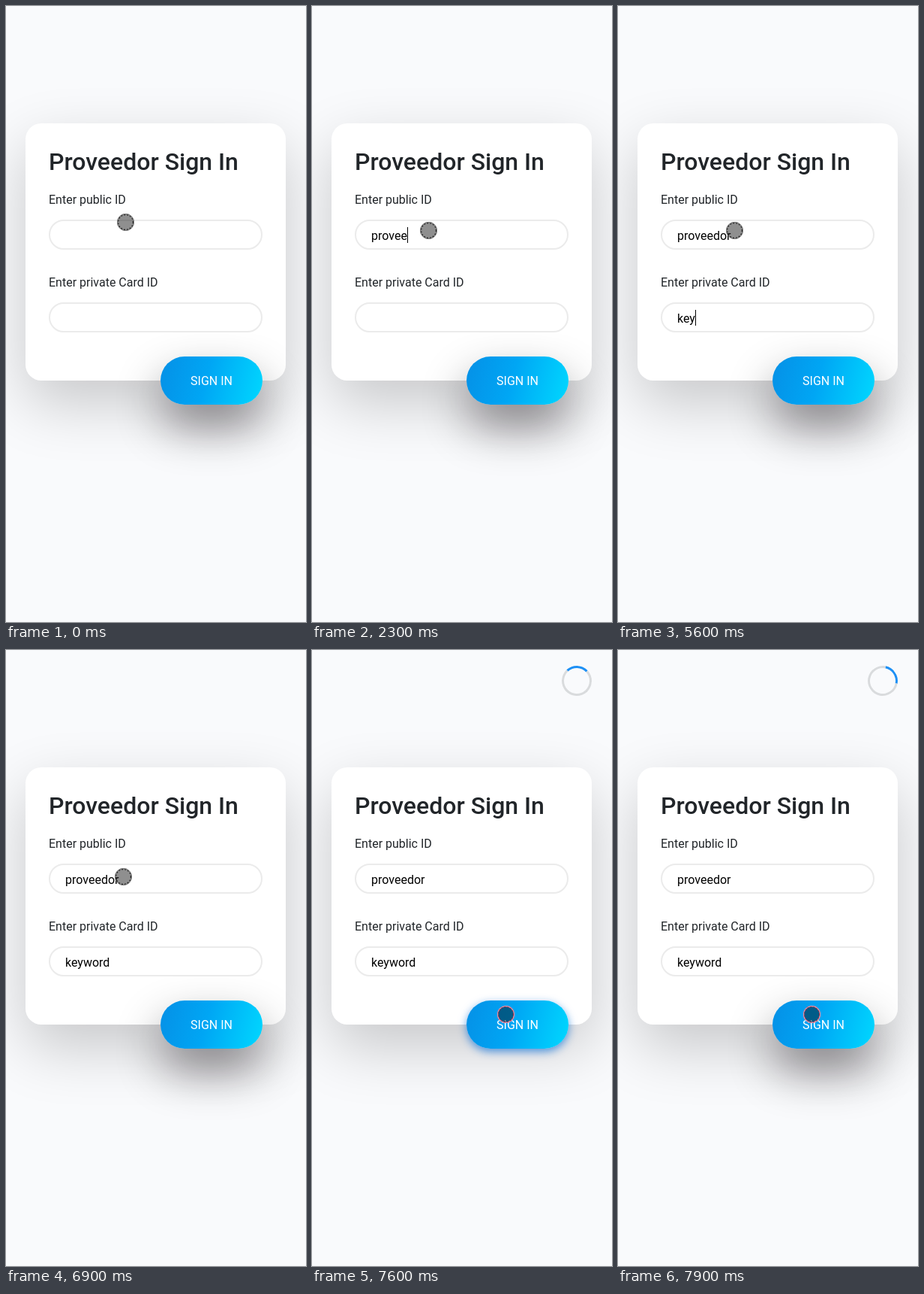
These frames come from a looping animation (400x819 px, 8000 ms). An HTML page:

```html
<!DOCTYPE html>
<html lang="en">
<head>
<meta charset="utf-8">
<title>Sign in</title>
<style>
  html, body { margin: 0; width: 100%; height: 100%; overflow: hidden; background: #f9fafc; }
  #stage {
    position: relative; width: 400px; height: 819px; overflow: hidden;
    background: #f9fafc; color: #212529;
    font: 400 16px/19px Roboto, sans-serif; white-space: pre;
  }
  #stage > * { position: absolute; box-sizing: border-box; }
  .card {
    left: 26px; top: 156px; width: 347px; height: 342px; border-radius: 21px;
    background: #fff; box-shadow: 0 30px 80px rgba(0, 0, 0, .2);
  }
  .title { left: 57px; top: 188px; font-size: 32px; font-weight: 500; line-height: 38px; }
  .label { left: 57px; }
  .field {
    left: 57px; width: 285px; height: 40px;
    border: 2px solid #ebebeb; border-radius: 20px; background: #fff;
  }
  .typed { left: 79px; color: #000; }
  #caret { width: 1px; height: 21px; background: #000; }
  #button {
    left: 206px; top: 466px; width: 136px; height: 64px; border-radius: 32px;
    background: linear-gradient(105deg, #0590e6, #00a6f4 45%, #00d8ff);
    box-shadow: 0 30px 60px rgba(10, 5, 12, .45);
    color: #fff; text-align: center; line-height: 65px;
  }
  #button.pressed { box-shadow: 0 4px 12px rgba(0, 105, 215, .65); }
  #spinner {
    left: 333px; top: 21px; width: 40px; height: 40px; border-radius: 50%;
    border: 3px solid #d9dbdd; border-top-color: #1e90f5;
  }
  #pointer { left: 0; top: 0; width: 24px; height: 24px; }
  #pointer .disc { fill: rgba(0, 0, 0, .44); }
  #pointer .rim { fill: none; stroke: #777; stroke-width: 1; }
  #pointer .dots { fill: none; stroke: #222; stroke-width: 1.2; stroke-dasharray: 2 2; }
  #pointer.inverted .rim { stroke: #e58fa6; stroke-width: 1.4; }
  #pointer.inverted .dots { stroke: #74324f; }
</style>
</head>
<body>
<div id="stage">
  <div class="card"></div>
  <div id="button">SIGN IN</div>
  <div class="title">Proveedor Sign In</div>
  <div class="label" style="top:248px">Enter public ID</div>
  <div class="field" style="top:284px"></div>
  <div class="label" style="top:358px">Enter private Card ID</div>
  <div class="field" style="top:394px"></div>
  <span class="typed" id="publicId" style="top:296px"></span>
  <span class="typed" id="cardId" style="top:406px"></span>
  <div id="caret"></div>
  <div id="spinner"></div>
  <svg id="pointer" viewBox="-12 -12 24 24">
    <circle class="disc" r="11.4"/>
    <circle class="rim" r="11"/>
    <circle class="dots" r="9.9"/>
  </svg>
</div>
<script>
  const LOOP = 8000, STEP = 100, BLINK = 500;
  const PRESS = 7600, RELEASE = 7800;
  const $ = id => document.getElementById(id);

  // [time, text]
  const publicKeys = [
    [0, ''], [1600, 'pr'], [1700, 'pro'], [2000, 'prov'], [2200, 'prove'],
    [2300, 'provee'], [2800, 'proveedr'], [3400, 'proveed'],
    [3700, 'proveedo'], [3800, 'proveedor']
  ];
  const cardKeys = [
    [0, ''], [5000, 'k'], [5100, 'ke'], [5600, 'key'], [5900, 'keyw'],
    [6100, 'keywo'], [6300, 'keywor'], [6400, 'keyword']
  ];
  const focusTimes = [800, 4100];

  // [time, x, y] of the pointer centre
  const path = [
    [0, 159.5, 287.5], [300, 159, 289.5], [400, 158, 292.5], [500, 157, 295.5],
    [600, 156, 297.5], [700, 155.5, 298.5], [6900, 156.5, 301.5],
    [7000, 167.5, 323.5], [7100, 195.5, 379.5], [7200, 229.5, 442.5],
    [7300, 282.5, 492.5], [7400, 258.5, 484.5]
  ];

  const latest = (table, t) => table.filter(row => row[0] <= t).pop();

  function drawCaret(t) {
    const second = t >= focusTimes[1];
    const last = Math.max(focusTimes[+second], latest(second ? cardKeys : publicKeys, t)[0]);
    const shown = t >= last && t - last < BLINK;
    const width = $(second ? 'cardId' : 'publicId').getBoundingClientRect().width;
    $('caret').style.visibility = shown ? 'visible' : 'hidden';
    $('caret').style.left = 79 + Math.round(width) + 'px';
    $('caret').style.top = (second ? 404 : 294) + 'px';
  }

  function draw(t) {
    $('publicId').textContent = latest(publicKeys, t)[1];
    $('cardId').textContent = latest(cardKeys, t)[1];
    drawCaret(t);

    const [, x, y] = latest(path, t);
    $('pointer').style.transform = `translate(${x - 12}px, ${y - 12}px)`;
    $('pointer').classList.toggle('inverted', y > 470);

    $('button').classList.toggle('pressed', t >= PRESS && t < RELEASE);
    $('spinner').style.visibility = t >= PRESS ? 'visible' : 'hidden';
    $('spinner').style.transform = `rotate(${2 + (t - PRESS) * 0.18}deg)`;
  }

  function tick() {
    const t = performance.now() % LOOP;
    draw(Math.floor(t / STEP) * STEP);
    requestAnimationFrame(tick);
  }
  tick();
</script>
</body>
</html>
```
